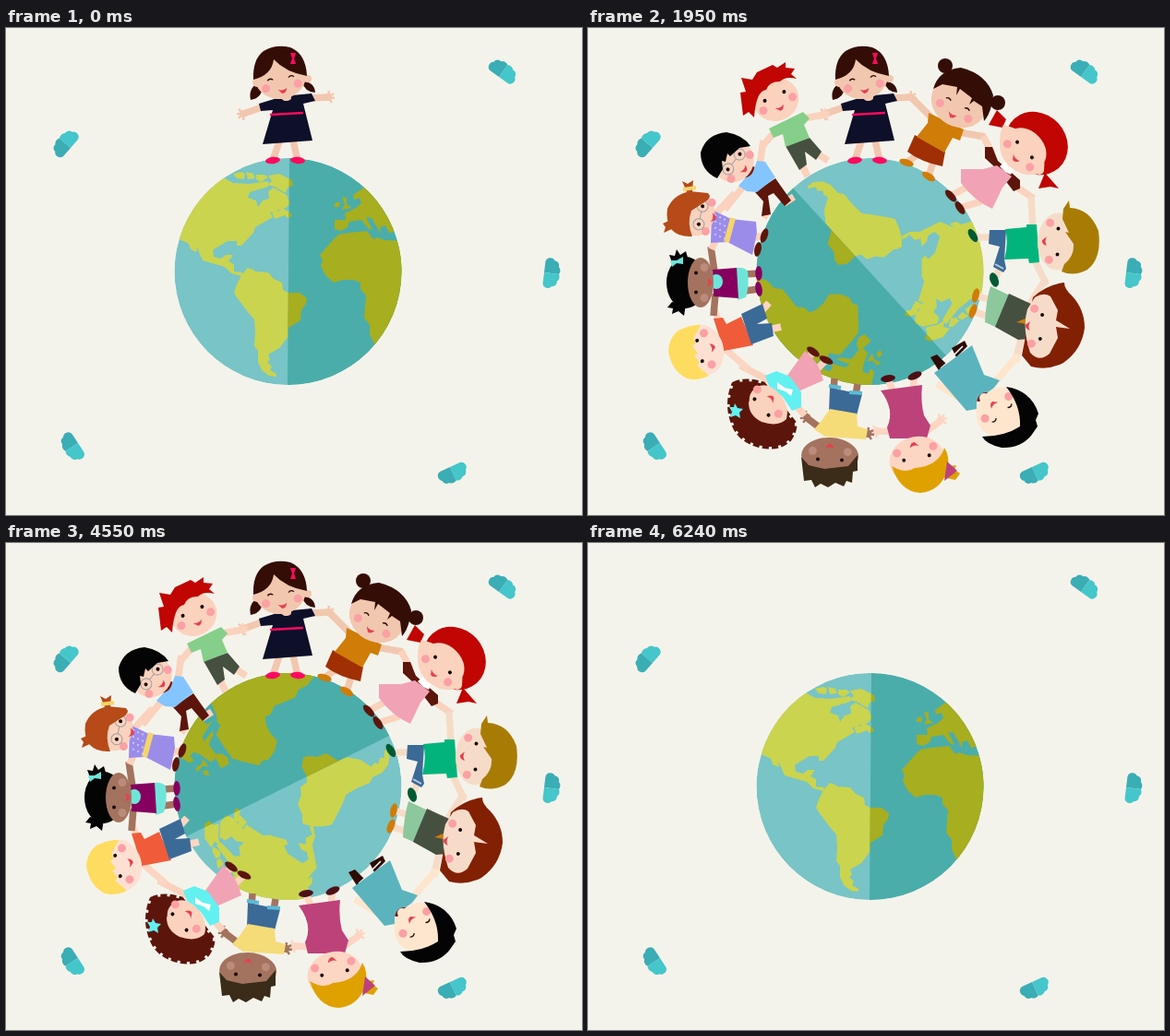
Animation, 624 px wide and 528 px high, one loop 6890 ms. Source, as an HTML page:

```html
<!DOCTYPE html>
<html lang="en">
<head>
<meta charset="utf-8">
<title>Children around the globe</title>
<style>
html, body { margin: 0; width: 100%; height: 100%; overflow: hidden; background: #f4f3eb; }
svg { display: block; width: 100%; height: 100%; }
</style>
</head>
<body>
<svg viewBox="0 0 624 528">
  <defs>
    <clipPath id="disc"><circle cx="305.5" cy="264" r="123"/></clipPath>
    <clipPath id="night"><path d="M307 141A123 123 0 0 1 305 387z"/></clipPath>
    <g id="land"></g>
  </defs>
  <g id="clouds"></g>
  <g id="globe" clip-path="url(#disc)">
    <circle cx="305.5" cy="264" r="123" fill="#78c4c6"/>
    <use href="#land" fill="#cad44f"/>
    <g clip-path="url(#night)">
      <path d="M300 140H430V390H300z" fill="#4aadaa"/>
      <use href="#land" fill="#a7ae1f"/>
    </g>
  </g>
  <g id="kids"></g>
</svg>
<script>
const CX = 305.5, CY = 264;
const get = id => document.getElementById(id);

// Drawing helpers append to the current group.
let group = get("land");
const add = markup => group.insertAdjacentHTML("beforeend", markup);
const fill = (color, d) => add(`<path fill="${color}" d="${d}"/>`);
const line = (color, width, d) =>
  add(`<path fill="none" stroke="${color}" stroke-width="${width}" stroke-linejoin="round" d="${d}"/>`);
const oval = (color, x, y, rx, ry = rx, turn = 0) =>
  add(`<ellipse fill="${color}" rx="${rx}" ry="${ry}" transform="translate(${x} ${y}) rotate(${turn})"/>`);

function within(transform, draw) {
  const outer = group;
  add(`<g transform="${transform}"></g>`);
  group = outer.lastElementChild;
  draw();
  group = outer;
}
const at = (x, y, turn, draw) => within(`translate(${x} ${y}) rotate(${turn})`, draw);

const land = d => add(`<path d="${d}"/>`);
// North America
land("M180 225L190 140 237 163 246 168 263 169 284 166 284 172 264 178 262 184 271 187 273 194 278 187 285 185 284 177 290 173 304 181 308 190 303 195 286 200 289 205 270 216 268 222 255 236 250 236 250 231 240 231 225 240 220 245z");
land("M192 215L230 232 224 240 225 248 233 250 238 246 246 246 241 253 247 256 247 264 256 265 255 269 244 266 237 259 213 252 206 236 201 226 207 241 206 243 200 240z");
land("M246 158l9-2 4 2-1 6-8-1zM260 156l8 2 2 5-8 1zM271 159h9l4 3-8 5-5-3z");
land("M284 160l12-2 14 7 1 6-6 2-2 6-12-7-9-2 6-4zM288 200l4-3 3 2 4-4 9 5 2 4-5 2-3-3-5 2-6 2z");
// South America
land("M255 268L262 260 268 262 270 264 284 265 290 272 299 276 300 284 306 287 318 287 326 293 325 299 320 306 319 317 306 325 305 335 296 347 262 308 250 292 247 287 250 278z");
land("M262 306L306 325 305 335 296 347 284 354 286 360 283 362 288 367 286 371 293 375 293 378 285 377 277 371 273 362 273 350 269 345 270 330 269 315z");
// Africa
land("M440 231L410 230 402 227 398 229 391 220 371 222 360 224 355 229 340 246 343 252 341 258 346 268 355 276 365 273 376 273 384 276 384 283 390 290 388 314 394 322 394 332 399 343 420 350z");
// Europe
land("M368 208L367 201 379 195 385 190 383 184 377 186 376 181 392 170 432 200 426 220 415 222 411 214 405 216 406 223 396 206 390 205 397 219 392 217 385 208 372 210 370 216 363 220 356 218 356 208z");
land("M364 183l5 1v7l5 4-10 2 3-6zM357 189h5l-1 5h-6z");

function hand(color, x, y, turn) {
  at(x, y, turn, () => {
    oval(color, 0, 0, 4);
    line(color, 2.4, "M1-7L0 0 6-4M7 1L0 0 4 6");
  });
}
const limb = (skin, x1, y1, x2, y2) => line(skin, 7.5, `M${x1} ${y1}L${x2} ${y2}`);
// A shoe lies along the tangent of the globe.
function leg(skin, shoe, x1, y1, x2, y2) {
  limb(skin, x1, y1, x2, y2);
  oval(shoe, x2, y2, 8, 3.7, Math.atan2(y2 - CY, x2 - CX) * 180 / Math.PI + 90);
}
// The origin of a head lies midway between its eyes.
function head(skin, x, y, turn, { w = 28, h = 25, lift = 2, spread = 11.5, closed = false, glasses = false, cheek = "#fba0a4" } = {}) {
  at(x, y, turn, () => {
    oval(skin, 0, -lift, w, h);
    for (const side of [-1, 1]) {
      const eye = side * spread;
      oval(cheek, side * (spread + 6), 9, 4.5);
      if (closed) line("#2a0c08", 1.3, `M${eye - 3} 1q3-3 6 0`);
      else oval("#1a0b08", eye, 0, 2);
      if (glasses) line("#9aa0a4", 1, `M0 0H${side * 4}a6 6 0 1 1 ${side * 12} 0a6 6 0 1 1 ${-side * 12} 0`);
    }
    fill("#e5424f", "M-5 12q5 3 10 0q-2 6-6 5z");
  });
}

function nextKid() {
  group = get("kids");
  add("<g></g>");
  group = group.lastElementChild;
}

const dark = "#350d07", cocoa = "#5c150b", red = "#c00503", pink = "#ff0a5e", rose = "#f1a3b5",
  jeans = "#3c6a97", orange = "#cf7c08", olive = "#465041", cyan = "#62f1f0", aqua = "#6fe5d9",
  plum = "#860060", brown = "#a3735f", tan = "#bb8b7b", peach = "#f2c7af", cream = "#f6dcc8",
  fair = "#fad2bd", pale = "#fde6cd", rosy = "#fdd5c3", black = "#050404", yellow = "#f5d56b";

nextKid(); // navy dress
leg(peach, pink, 296, 123, 289, 143.5);
leg(peach, pink, 311, 122, 316, 143.5);
limb(peach, 277, 86, 257, 93);
limb(peach, 332, 76, 349, 75);
hand(peach, 257, 93, 170);
hand(peach, 349, 75, 0);
fill(dark, "M275 59Q262 64 265 78Q277 76 278 64zM321 58Q334 58 335 70Q323 69 321 58z");
fill("#0e0f29", "M274 82L297 75Q304 84 310 73L331 71 335 79 322 82 332 122 278 126 289 89 276 90z");
line(pink, 2.5, "M286 94L322 92");
oval(peach, 304, 76, 5, 3);
oval(peach, 272, 59, 5);
oval(peach, 327, 55, 4);
head(peach, 297.5, 54, -9, { closed: true });
fill(dark, "M268 56Q267 34 279 25Q292 17 308 21Q325 28 326 52Q303 48 290 34Q288 51 268 56z");
fill(pink, "M308 27h6l-2 6 2 6h-6l2-6z");

nextKid(); // two buns
leg(peach, orange, 359, 136, 345, 146);
leg(peach, orange, 374, 145, 369, 161);
limb(peach, 372, 97, 351, 76);
limb(peach, 402, 113, 430, 118);
fill("#a02f04", "M354 116L387 134 384 150Q360 145 346 134z");
fill(orange, "M369 92L407 110 403 122 395 119 386 135 356 118 368 103z");
oval(dark, 387, 41, 8);
oval(dark, 444, 81, 8);
head(peach, 401, 82, 29, { closed: true, w: 31, h: 27 });
fill(dark, "M374 66Q380 45 404 43Q432 50 439 73Q437 92 429 101L427 85 418 79 413 83 416 76 403 66 399 73 400 64 384 61z");

nextKid(); // red pigtails
leg(fair, cocoa, 413, 171, 393, 182);
leg(fair, cocoa, 426, 188, 403, 195);
limb(fair, 438, 136, 428, 117);
limb(fair, 464, 172, 483, 185);
fill(cocoa, "M430 129L438 129 444 144 468 165 468 174 461 177 441 151 430 141z");
fill(rose, "M428 153L443 149 459 161 449 173 438 196Q419 188 404 168L404 153z");
fill("#fff", "M446 150l7-6 2 8 7-2-4 9-6-3z");
fill(red, "M434 105L443 89 453 99 449 108zM488 174L495 157 510 174 501 172z");
oval(red, 486, 125, 36, 32, 48);
oval(fair, 489, 154, 5);
fill(fair, "M450 105Q475 111 489 126Q496 140 494 154Q486 162 470 158Q446 148 446 125Q446 112 450 105z");
head(fair, 473, 132, 46, { w: 25, h: 19 });

nextKid(); // green shirt
limb(cream, 436, 227, 419, 227);
limb(cream, 447, 256, 442, 270);
oval("#005b35", 417, 225, 8, 4, 58);
oval("#005b35", 440, 273, 8, 4.5, 70);
limb(cream, 482, 217, 480, 183);
limb(cream, 483, 250, 495, 275);
oval(cream, 495, 275, 4.5);
fill(jeans, "M435 219H453L451 251 453 261 450 265 439 259 446 237 434 234z");
line("#b9cce0", 2, "M441 256l9 5");
fill("#02b47b", "M452 218L475 216V213H486L489 254 478 255 477 250 451 251Q456 233 452 218z");
head(cream, 509, 231.5, 92, { spread: 14, w: 31, h: 22, lift: 0 });
fill("#a87c04", "M515 196L521 187 522 195Q544 196 553 220Q557 250 541 262Q526 270 513 264L516 256Q527 247 526 234L517 221 521 222 514 207z");

nextKid(); // long auburn hair
leg(cream, orange, 437, 295, 420, 290);
leg(cream, orange, 434, 313, 417, 307);
limb(cream, 476, 303, 494, 275);
limb(cream, 470, 333, 463, 362);
fill("#8dc79c", "M436 280L457 290 446 326 430 319Q431 297 436 280z");
fill(olive, "M456 288L482 300 478 337 466 338 441 324z");
fill(orange, "M464 319L476 314 475 321z");
fill("#822003", "M482 292Q497 278 516 276Q516 283 524 290Q538 305 538 325Q535 349 515 363Q498 372 480 367L470 355z");
fill(cream, "M484 292Q494 286 501 291L509 306 507 317 522 326 507 324 509 336 500 353Q489 363 479 352Q470 325 476 305z");
head(cream, 491, 324, 95, { spread: 13, w: 26, h: 15, lift: 0 });

nextKid(); // teal shirt
limb(pale, 440, 385, 464, 357);
limb(pale, 416, 409, 378, 386);
oval(pale, 464, 358, 5);
fill("#2d0b06", "M371 357L378 354 390 366 381 373zM394 347L408 339 411 345 399 357z");
line("#fff", 1.5, "M382 369l7-6M397 354l9-9");
fill("#5bb4bd", "M375 374L416 344 429 376 446 382 440 390 421 404 421 413 410 415z");
line("#7a1810", 4, "M423 405Q425 396 434 397");
oval(pale, 429, 401, 5);
head(pale, 449, 418, 137, { closed: true, h: 26, lift: -2 });
fill(black, "M453 389Q480 393 488 418L485 425 487 432 480 442Q468 456 448 455Q431 451 427 443Q451 443 468 432Q469 409 453 389z");

nextKid(); // magenta dress
leg(rosy, "#4d0f16", 330, 393, 325, 380);
leg(rosy, "#4d0f16", 352, 390, 354, 377);
limb(rosy, 330, 438, 313, 437);
limb(rosy, 365, 438, 382, 426);
hand(rosy, 313, 437, 180);
hand(rosy, 382, 425, -25);
fill("#bd427a", "M317 393L362 387Q360 405 364 420L371 431 367 445H327L324 433Q333 414 317 393z");
fill("#dfa100", "M384 476L399 474 397 479 403 483 398 490 384 487z");
head(rosy, 356, 466, 169, { spread: 14, w: 30 });
fill("#dfa100", "M329 475Q344 484 354 477Q380 475 386 455Q393 465 389 480Q382 502 360 504Q338 503 329 475z");
fill("#bd427a", "M389 470L400 480 386 491z");

nextKid(); // yellow shirt
limb(brown, 266, 394, 267, 380);
limb(brown, 290, 398, 292, 386);
limb(brown, 252, 434, 236, 422);
limb(brown, 296, 440, 306, 440);
hand(brown, 237, 422, 205);
hand(brown, 303, 440, 0);
fill(jeans, "M262 390L297 397 291 420 261 416z");
line("#59bbd8", 4, "M261 388L274 390M283 395L297 396");
fill("#f5dc79", "M262 413L291 418 292 432 303 435 301 446 257 443 245 435 253 426z");
head(brown, 262, 468, 182, { spread: 13, w: 31, h: 20, lift: -4, cheek: tan });
fill("#3a2c19", "M231 465L239 474 256 478 282 475 292 463 292 480 287 481 286 493 280 491 277 497 268 493 260 498 252 494 246 498 242 490 234 491z");

nextKid(); // curly hair
leg(fair, cocoa, 237, 360, 244, 351);
leg(fair, cocoa, 247, 371, 258, 360);
limb(fair, 198, 383, 165, 366);
limb(fair, 224, 408, 235, 420);
fill(rose, "M215 378L235 350Q250 361 255 382L228 394z");
fill(cyan, "M192 377L204 372 219 378 231 395V411L221 415 211 400 196 388z");
fill("#fff", "M205 384l8 6 9 2-2 7-6-5-9-3z");
const curls = "M158 386Q170 380 190 386L224 429Q224 438 218 446Q207 457 188 453Q165 448 158 430Q149 408 158 386z";
fill(cocoa, curls);
line(cocoa, 5, curls + `" stroke-dasharray="7 3`);
fill(fair, "M183 389Q195 383 208 397Q219 411 215 424Q206 433 188 427Q174 420 174 406z");
head(fair, 188, 411, 229, { w: 20, h: 16, lift: -6 });
fill(cyan, "M159 407l3 5 6 1-4 4 1 6-5-3-6 2 2-6-3-5h5z");

nextKid(); // orange shirt
limb(rosy, 188, 307, 196, 298);
limb(rosy, 196, 327, 209, 324);
limb(rosy, 142, 319, 137, 306);
limb(rosy, 145, 345, 174, 370);
fill("#f05c39", "M136 315L146 314 150 321 166 313 179 344 142 351 137 345 142 334z");
fill(jeans, "M166 310L189 299 194 315 183 321 199 320 201 334 177 343z");
head("#fde0d2", 121, 350, 256, { h: 23, lift: -3 });
fill("#fedc5f", "M98 328Q111 321 122 322L114 337 117 341 113 345 119 353 115 355 121 363 118 366 131 377Q119 383 107 380Q90 371 87 350Q88 335 98 328z");

nextKid(); // black pigtails
leg(brown, plum, 170, 267, 185, 266);
leg(brown, plum, 170, 285, 185, 283);
limb(brown, 137, 264, 133, 237);
limb(brown, 138, 288, 136, 312);
fill(aqua, "M160 260Q170 259 173 264Q175 279 171 292L162 295z");
fill(plum, "M135 262L161 260 163 293 136 291z");
oval(aqua, 139, 275, 7, 8);
fill(black, "M91 254L88 246 94 247 96 240 100 246 106 242 109 252zM91 297L86 303 92 304 91 310 98 307 104 312 106 300z");
oval(black, 106, 276, 21, 28);
head(brown, 117, 276, 270, { spread: 10.5, w: 27, h: 14, lift: -5, cheek: tan });
fill(aqua, "M89 252h7l7-4v8l-7-1-5 4z");

nextKid(); // lilac dress
leg(fair, cocoa, 177, 228, 191, 225);
leg(fair, cocoa, 173, 239, 184, 240);
limb(fair, 138, 202, 159, 179);
limb(fair, 138, 230, 134, 240);
fill("#9c8cea", "M134 197L155 207 182 210 183 222 178 246 151 232 133 233z");
line(yellow, 6, "M157 206L150 232");
for (let i = 0; i < 12; i++) oval("#d7d0ff", 138 + i % 3 * 5, 203 + i * 2.3, 1);
fill("#b64a18", "M107 178L102 166 108 169 114 165 113 178zM92 207L81 212 84 216 82 222 95 216z");
line(yellow, 4, "M103 175L117 173M90 208L94 220");
head(fair, 122, 203, 282, { spread: 10, w: 23, h: 17, glasses: true });
fill("#b64a18", "M86 196Q92 181 110 177L130 179Q135 184 126 189L112 198Q107 211 113 226Q98 227 90 218Q84 208 86 196z");

nextKid(); // blue shirt
limb(fair, 212, 190, 223, 183);
limb(fair, 194, 200, 190, 206);
limb(fair, 186, 149, 190, 122);
limb(fair, 168, 172, 148, 197);
fill(cocoa, "M181 178L203 163 220 187 213 193 201 179 195 182 198 202 188 204 190 188z");
fill("#85c5ff", "M163 171L180 152 183 144 192 145 203 162 183 178 172 177z");
line("#7a1810", 5, "M168 160Q176 160 178 150");
head(fair, 158, 145, -52, { spread: 10.5, w: 23, h: 21, lift: 0, glasses: true });
fill(black, "M122 135Q128 115 150 113Q168 116 176 128L164 130 154 139 151 136 149 145 145 144 146 153 140 163Q122 155 122 135z");

nextKid(); // red-haired boy
limb(fair, 248, 136, 260, 144);
limb(fair, 232, 149, 238, 161);
limb(fair, 234, 98, 256, 94);
limb(fair, 203, 112, 188, 129);
hand(fair, 256, 94, 0);
fill(olive, "M214 128L240 119 253 134 247 143 235 134 237 148 229 154z");
fill("#85cf8a", "M196 109L233 91 240 98 234 105 240 119 214 129 211 115 201 119z");
head(fair, 202, 74, -25, { w: 25, h: 23, lift: -4 });
fill(red, "M168 95L165 70 171 69 166 54 178 56 183 48 200 40 205 43 214 37V43L224 44 220 50 226 55Q214 52 208 58Q196 58 193 67Q182 68 180 97L174 91z");

function cloud(x, y, turn, flip) {
  const half = "M0 0H-12A5.5 5.5 0 0 1-14-10A5 5 0 0 1-8-15A6 6 0 0 1 0-16z";
  at(x, y, turn, () => {
    within(`scale(1 ${flip})`, () => fill("#3badb5", half));
    within(`scale(-1 ${flip})`, () => fill("#45c6ca", half));
  });
}
group = get("clouds");
cloud(534, 53, 36, 1);
cloud(70, 130, -49, 1);
cloud(583, 265, 97, 1);
cloud(78, 450, 57, -1);
cloud(481, 476, -25, -1);

const LOOP = 6890, TICK = 130, LAST_TICK = 48;
const pauses = [11, 16, 18, 20, 22, 24, 26, 27];
// step, globe angle, degrees per step
const spin = [[0, 0, 16], [3, 42, 12], [10, 107.5, 7.6], [17, 159.5, 7.6], [22, 198, 8], [32, 291.3, 9.2], [40, 360, 8]];

function angleAt(step) {
  const i = Math.max(1, spin.findIndex(key => key[0] >= step));
  const [s0, a0, r0] = spin[i - 1], [s1, a1, r1] = spin[i];
  const span = s1 - s0, u = (step - s0) / span, v = 1 - u;
  return v * v * ((1 + 2 * u) * a0 + u * span * r0) + u * u * ((3 - 2 * u) * a1 - v * span * r1);
}

function render(time) {
  const tick = Math.min(LAST_TICK, Math.floor(time % LOOP / TICK));
  const step = tick - pauses.filter(pause => pause <= tick).length;
  const shown = tick === LAST_TICK ? 0 : step + 1;
  get("globe").setAttribute("transform", `rotate(${angleAt(step)} ${CX} ${CY})`);
  [...get("kids").children].forEach((kid, i) => kid.setAttribute("display", i < shown ? "inline" : "none"));
}

const start = performance.now();
function loop() {
  render(performance.now() - start);
  requestAnimationFrame(loop);
}
loop();
</script>
</body>
</html>
```
